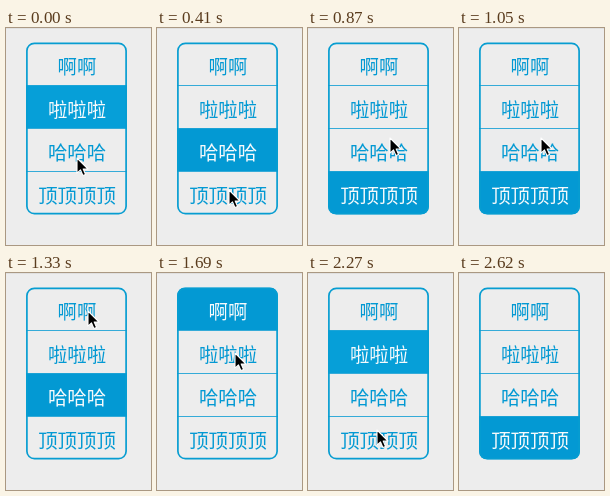
Write an HTML page that moves like this. It is 145x217 px and loops after 2.91 s.

```html
<!DOCTYPE html>
<html lang="zh">
<head>
<meta charset="utf-8">
<style>
html, body { margin: 0; width: 100%; height: 100%; overflow: hidden; background: #ededed; }
svg { display: block; width: 145px; height: 217px; }
text { font: 19.4px "Noto Sans CJK SC", "Noto Sans CJK", sans-serif; text-anchor: middle; }
</style>
</head>
<body>
<svg viewBox="0 0 145 217">
  <path d="M0 .5H145" stroke="#e0e0e0"/>
  <clipPath id="round"><rect x="20" y="14.5" width="101" height="172" rx="8"/></clipPath>
  <g id="rows" clip-path="url(#round)"></g>
  <rect x="20.9" y="15.3" width="99.2" height="170.4" rx="7.5" fill="none" stroke="#079dd1" stroke-width="1.7"/>
  <path id="cursor" d="M0 0V15.2L3.5 11.9L6 17.6L8.6 16.5L6.2 11H11Z" stroke="#fff" stroke-width="1.1" stroke-linejoin="round"/>
</svg>
<script>
const LOOP = 2910;
const BLUE = [3, 153, 211];
const WHITE = [246, 250, 252];
const FILLS = ['#0399d3', '#069fd8', '#0399d3', '#0399d3'];
const rowsEl = document.getElementById('rows');
const cursor = document.getElementById('cursor');

// start, end, newly selected row, pointer tip at the end
const moves = [
  [0, 0, 1, 71, 130],
  [110, 410, 2, 72, 162],
  [580, 870, 3, 82, 110],
  [1050, 1330, 2, 82, 38],
  [1510, 1690, 0, 78, 80],
  [1920, 2270, 1, 69, 157],
  [2450, 2620, 3, 73, 222]
];

function add(parent, tag, attrs) {
  const el = document.createElementNS('http://www.w3.org/2000/svg', tag);
  for (const k in attrs) el.setAttribute(k, attrs[k]);
  return parent.appendChild(el);
}

const rows = ['啊啊', '啦啦啦', '哈哈哈', '顶顶顶顶'].map((label, i) => {
  const y = 14.5 + 43 * i;
  if (i) add(rowsEl, 'path', { d: `M20 ${y}H121`, stroke: '#35abd8' });
  const fill = add(rowsEl, 'rect', { x: 20, y, width: 101, height: 43, fill: FILLS[i] });
  const text = add(rowsEl, 'text', { x: 71, y: y + 31 });
  text.textContent = label;
  return { fill, text };
});

const clamp = v => Math.min(1, Math.max(0, v));
const ease = v => v * v * (3 - 2 * v);
const mix = (a, b, p) => a + (b - a) * p;

function draw(t) {
  let n = moves.length - 1;
  while (n && moves[n][0] > t) n--;
  const [start, end, row, x, y] = moves[n];
  const [, , oldRow, oldX, oldY] = moves[Math.max(0, n - 1)];
  const fade = n ? clamp((t - start) / 130) : 1;
  const go = n ? ease(clamp((t - start) / (end - start))) : 1;

  rows.forEach(({ fill, text }, i) => {
    const on = i === row ? fade : i === oldRow ? 1 - fade : 0;
    fill.setAttribute('opacity', on);
    text.setAttribute('fill', `rgb(${BLUE.map((c, k) => mix(c, WHITE[k], on))})`);
  });
  cursor.setAttribute('transform', `translate(${mix(oldX, x, go)} ${mix(oldY, y, go)})`);
}

const t0 = performance.now();
function frame() {
  draw((performance.now() - t0) % LOOP);
  requestAnimationFrame(frame);
}
frame();
</script>
</body>
</html>
```
